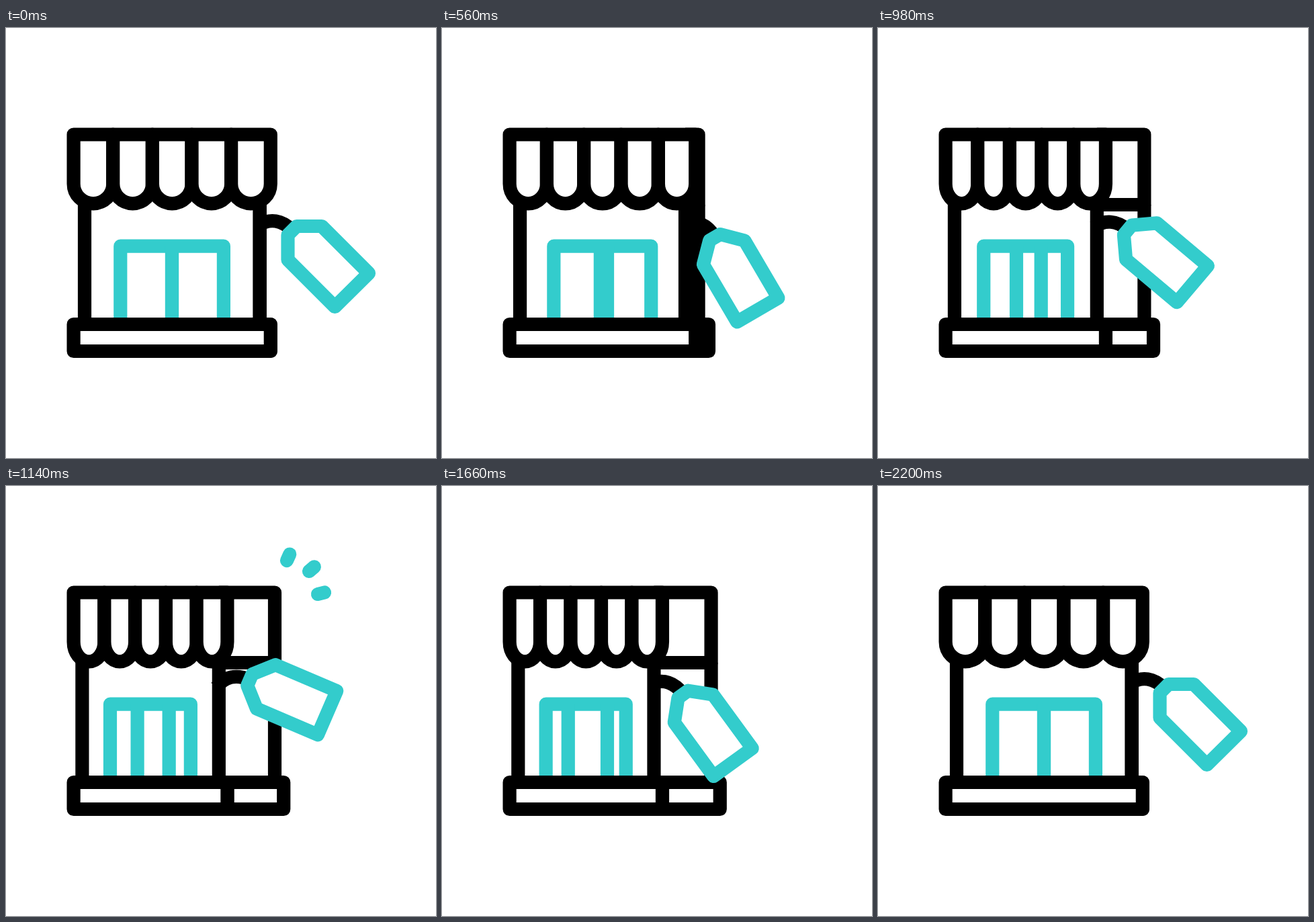
An HTML page with a canvas that plays this animation: 640x640 px, repeating every 2400 ms.

```html
<!DOCTYPE html>
<html lang="en">
<head>
<meta charset="utf-8">
<title>Shop with price tag</title>
<style>
html, body { margin: 0; width: 100%; height: 100%; overflow: hidden; background: #fff; }
canvas { display: block; }
</style>
</head>
<body>
<canvas id="stage" width="640" height="640"></canvas>
<script>
const ctx = document.getElementById('stage').getContext('2d');
const LOOP = 2400, STEP = 20;
const BLACK = '#000', TEAL = '#33cccc', WHITE = '#fff';
const LEFT = 100.6, WIDTH = 293.2;

const clamp = v => Math.min(1, Math.max(0, v));
const ease = (t, a, b) => (1 - Math.cos(Math.PI * clamp((t - a) / (b - a)))) / 2;

// Eased interpolation through [time, value] keys
function track(t, keys) {
  let v = keys[0][1];
  for (let i = 1; i < keys.length; i++) {
    v += (keys[i][1] - keys[i - 1][1]) * ease(t, keys[i - 1][0], keys[i][0]);
  }
  return v;
}

function poly(points, color, closed, fill) {
  ctx.beginPath();
  points.forEach(([x, y]) => ctx.lineTo(x, y));
  if (closed) ctx.closePath();
  if (fill) { ctx.fillStyle = fill; ctx.fill(); }
  ctx.strokeStyle = color;
  ctx.stroke();
}

const box = (x1, y1, x2, y2, fill) =>
  poly([[x1, y1], [x2, y1], [x2, y2], [x1, y2]], BLACK, true, fill);

function drawSide(turn, right, wall) {
  const sideX = Math.max(wall, 375.2 + 26 * turn);
  const baseX = Math.max(right, 391.3 + 23 * turn);
  poly([[wall, 158.5], [sideX, 158.5], [sideX, 263], [wall, 263]], BLACK);
  poly([[sideX, 263], [sideX, 441]], BLACK);
  box(right, 441, baseX, 481, WHITE);
}

function drawDoors(open, px) {
  const l = px(69.7), r = px(223.3), top = 324.7;
  poly([[l, 441], [l, top], [r, top], [r, 441]], TEAL);
  const left = 247 - 62 * open, second = px(146.4 + 43 * open);
  for (const x of [left, second]) poly([[x, top], [x, 441]], TEAL);
}

function drawFront(right, wall, px) {
  for (const x of [px(16.4), wall]) poly([[x, 255], [x, 441]], BLACK);
  box(LEFT, 441, right, 481, WHITE);

  const gap = (right - LEFT) / 5;
  ctx.strokeStyle = BLACK;
  for (let i = 0; i < 5; i++) {
    const x = LEFT + gap * i;
    ctx.beginPath();
    ctx.moveTo(x + gap, 158.5);
    ctx.lineTo(x + gap, 232);
    ctx.ellipse(x + gap / 2, 232, gap / 2, 29.3, 0, 0, Math.PI);
    ctx.lineTo(x, 158.5);
    ctx.closePath();
    ctx.fillStyle = WHITE;
    ctx.fill();
    ctx.stroke();
  }
}

function drawTag(t, turn, wall) {
  const angle = track(t, [[200, 0], [640, 15.8], [700, 15.8], [1275, -27.5], [1690, 9.3], [2200, 0]]);
  const sag = clamp((turn - 0.2) * 4);
  ctx.save();
  ctx.translate(wall + 8.5 - 3 * sag, 292 + 2.6 * sag);
  ctx.rotate(angle * Math.PI / 180);
  ctx.strokeStyle = BLACK;
  ctx.beginPath();
  ctx.moveTo(-10, 1);
  ctx.quadraticCurveTo(16, -14, 39.8, 9);
  ctx.stroke();
  ctx.translate(-386.2, -292);
  poly([[419.5, 308], [432.5, 295], [470, 295], [540, 365], [489.5, 415], [419.5, 345]], TEAL, true, WHITE);
  ctx.restore();
}

function drawSparks(t) {
  const head = 33 * ease(t, 1000, 1370), tail = 33 * ease(t, 1140, 1510);
  if (head - tail < 0.2) return;
  ctx.lineCap = 'round';
  for (const [x, y, deg] of [[418, 111, -66], [451, 127, -40.6], [464, 161, -14]]) {
    const a = deg * Math.PI / 180;
    poly([tail, head].map(d => [x + d * Math.cos(a), y + d * Math.sin(a)]), TEAL);
  }
  ctx.lineCap = 'butt';
}

function draw(t) {
  const turn = ease(t, 200, 1290) - ease(t, 1600, 2200);
  const open = ease(t, 200, 1490) - ease(t, 1580, 2170);
  const right = LEFT + WIDTH - 67.5 * turn;
  const px = d => LEFT + d * (right - LEFT) / WIDTH;
  const wall = px(277.1);

  ctx.fillStyle = WHITE;
  ctx.fillRect(0, 0, 640, 640);
  ctx.lineWidth = 20.2;
  ctx.lineJoin = 'round';
  ctx.lineCap = 'butt';
  drawSide(turn, right, wall);
  drawDoors(open, px);
  drawFront(right, wall, px);
  drawTag(t, turn, wall);
  drawSparks(t);
}

const start = performance.now();
function tick() {
  const t = (performance.now() - start) % LOOP;
  draw(Math.floor(t / STEP) * STEP);
  requestAnimationFrame(tick);
}
tick();
</script>
</body>
</html>
```
